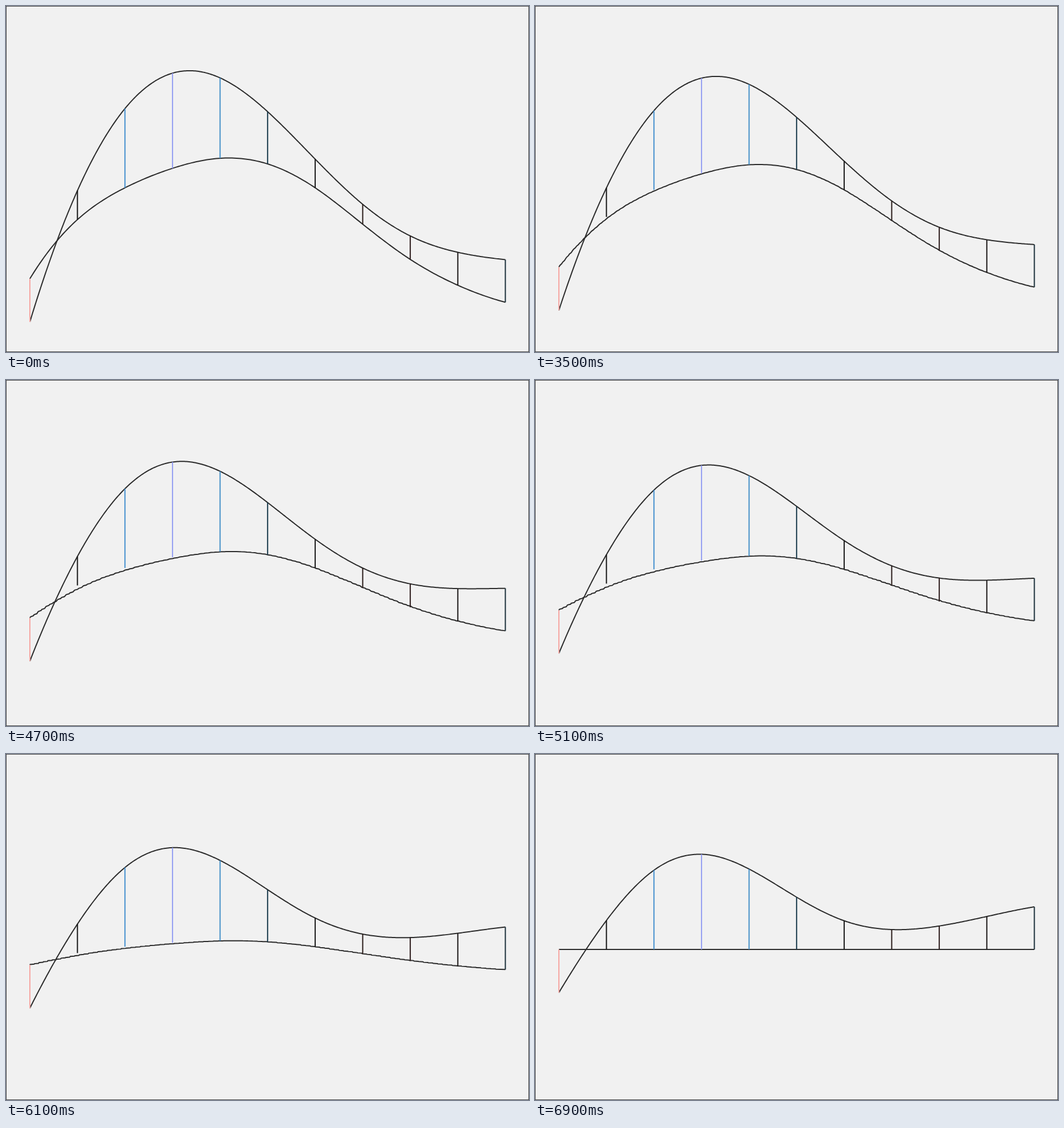
An HTML page with a canvas for the animation above (10 s loop, 920 by 609 pixels).

```html
<!DOCTYPE html>
<html lang="en">
<head>
<meta charset="utf-8">
<title>Curve flattening to its baseline</title>
<style>
  html, body { margin: 0; width: 100%; height: 100%; overflow: hidden; background: #f1f1f1; }
  canvas { display: block; }
</style>
</head>
<body>
<canvas id="stage" width="920" height="609"></canvas>
<script>
const ctx = document.getElementById('stage').getContext('2d');
const LEFT = 42, STEP = 83.64, WIDTH = STEP * 10, FLAT = 344;
const LOOP = 10000, HOLD = 3000, TICK = 100, TICKS = 40;

const base = [480, 376, 320, 285.7, 268, 278, 320, 384, 446, 491.5, 521.5];
const heights = [-76, 51, 139.5, 167.5, 141.5, 92, 50.5, 35, 41.3, 58, 75];
const colors = ['#f6a6a2', '#151515', '#438fce', '#939df2', '#438fc8', '#17384a',
                '#141414', '#271a17', '#2b1a1a', '#1a1616', '#1b303a'];

// Cubic spline through evenly spaced values, as a function of x.
function spline(v) {
  const n = v.length - 1;
  const slope = v.map(() => 0);
  slope[0] = (-11 * v[0] + 18 * v[1] - 9 * v[2] + 2 * v[3]) / 6;
  slope[n] = (11 * v[n] - 18 * v[n - 1] + 9 * v[n - 2] - 2 * v[n - 3]) / 6;
  for (let pass = 0; pass < 30; pass++)
    for (let i = 1; i < n; i++)
      slope[i] = (3 * (v[i + 1] - v[i - 1]) - slope[i - 1] - slope[i + 1]) / 4;
  return x => {
    const p = (x - LEFT) / STEP;
    const i = Math.max(0, Math.min(n - 1, Math.floor(p)));
    const u = p - i, w = 1 - u;
    return w * w * (1 + 2 * u) * v[i] + u * u * (3 - 2 * u) * v[i + 1]
         + u * w * (w * slope[i] - u * slope[i + 1]);
  };
}

const baseAt = spline(base), heightAt = spline(heights);
const mix = (a, b, k) => a + (b - a) * k;

// Baseline points are spaced by arc length, and end on a grid of 100 cells.
function sampleBaseline() {
  const fine = [{ x: LEFT, y: baseAt(LEFT), s: 0 }];
  for (let i = 1; i <= 4000; i++) {
    const x = LEFT + WIDTH * i / 4000, y = baseAt(x), last = fine[i - 1];
    fine.push({ x, y, s: last.s + Math.hypot(x - last.x, y - last.y) });
  }
  const total = fine[4000].s, count = Math.ceil(total / 4), points = [];
  for (let i = 0, j = 0; i <= count; i++) {
    const share = Math.min(1, i * 4 / total);
    while (j < 4000 && fine[j].s < share * total) j++;
    points.push({ x: fine[j].x, y: fine[j].y, endX: LEFT + WIDTH * Math.round(share * 100) / 100 });
  }
  return points;
}
const baseline = sampleBaseline();

function stroke(points, color) {
  ctx.beginPath();
  for (const [x, y] of points) ctx.lineTo(x, y);
  ctx.strokeStyle = color;
  ctx.stroke();
}

function draw(k) {
  ctx.fillStyle = '#f1f1f1';
  ctx.fillRect(0, 0, 920, 609);
  ctx.lineWidth = 1;
  ctx.strokeStyle = '#444';
  ctx.strokeRect(0.5, 0.5, 919, 608);

  ctx.lineWidth = 2;
  stroke(baseline.map(p => [mix(p.x, p.endX, k), mix(p.y, FLAT, k)]), '#2b2b2b');
  const top = [];
  for (let i = 0; i <= 400; i++) {
    const x = LEFT + WIDTH * i / 400;
    top.push([x, mix(baseAt(x), FLAT, k) - heightAt(x)]);
  }
  stroke(top, '#2b2b2b');

  heights.forEach((h, i) => {
    const x = LEFT + STEP * i, y = mix(base[i], FLAT, k);
    stroke([[x, y], [x, y - h]], colors[i]);
  });
}

function frame() {
  const t = performance.now() % LOOP;
  const tick = Math.floor((t - HOLD) / TICK) + 1;
  draw(Math.max(0, Math.min(TICKS, tick)) / TICKS);
  requestAnimationFrame(frame);
}
frame();
</script>
</body>
</html>
```
